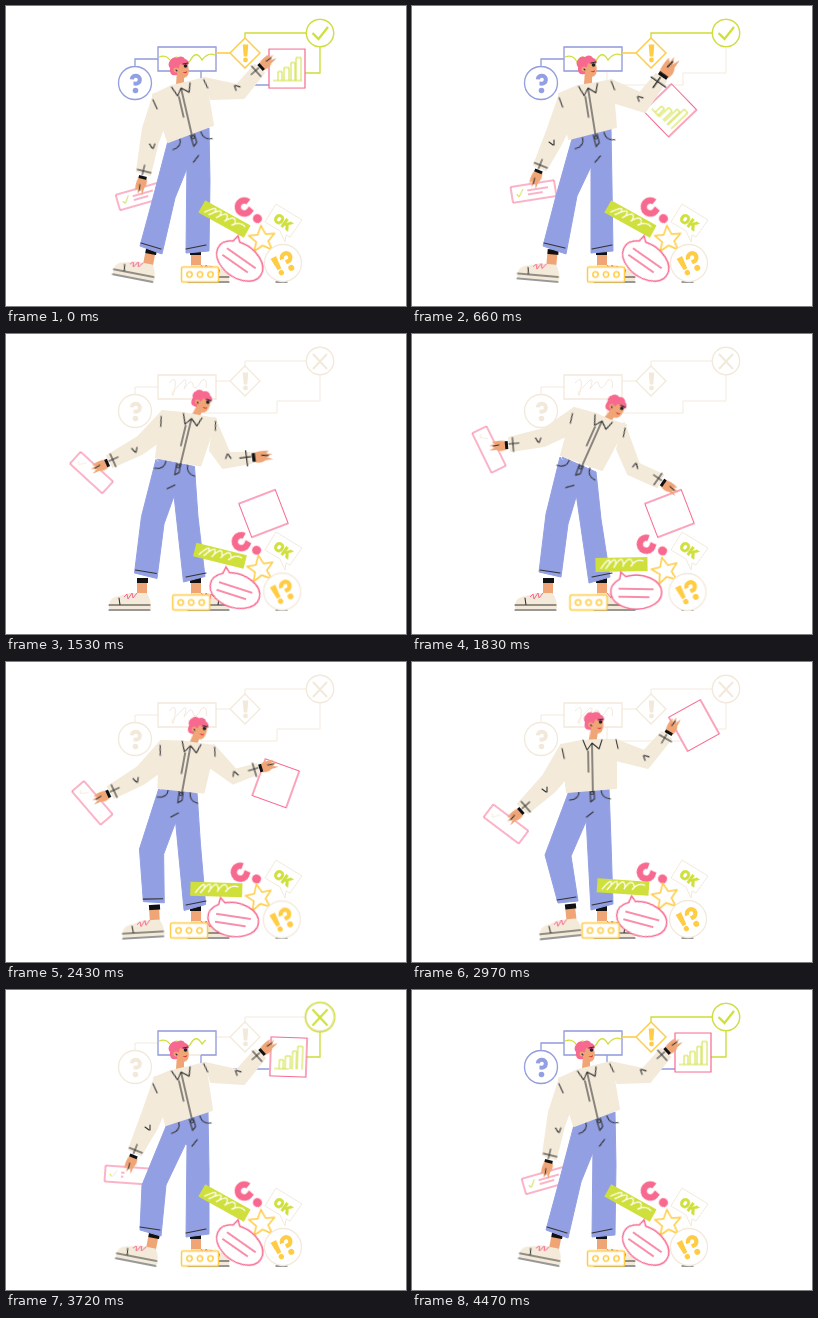
These frames come from a looping animation (400 px wide and 300 px high, 4.5 s). An HTML page without scripts:

```html
<!DOCTYPE html>
<html lang="en">
<head>
<meta charset="utf-8">
<title>Rebuilding a workflow</title>
<style>
html, body { margin: 0; width: 100%; height: 100%; overflow: hidden; background: #fff; }
svg { display: block; width: 100vw; height: 100vh; fill: none; }
svg * { animation: 4.5s ease-in-out infinite; }

.blue { stroke: #929fe2; }
.green { stroke: #cfe03c; }
.yellow { stroke: #fc4; }
.pink { stroke: #f7698f; }
.pale { stroke: #f3e9db; }
.ink { stroke: #333; stroke-width: 1.1; stroke-linecap: round; stroke-linejoin: round; }
.shirt { fill: #f3eada; stroke: #f3eada; stroke-width: 2; stroke-linejoin: round; }
.jeans { fill: #929fe2; stroke: #929fe2; stroke-linejoin: round; }
.skin { fill: #f0a576; }
.paper { fill: #fff; }
.trace { stroke-dasharray: 1 2; stroke-width: 1.3; }

/* Body */
#torso { animation-name: torso; }
@keyframes torso {
  0%, 100% { d: path("M147 89L166 80L183 76L199 72L207 119L162 136Z"); }
  14.7% { d: path("M147 88L166 80L185 77L200 74L204 121L157 133Z"); }
  27.3% { d: path("M150 80L170 78L190 78L206 79L199 127L151 126Z"); }
  40.7% { d: path("M162 74L184 80L197 86L214 91L190 136L149 121Z"); }
  66% { d: path("M149 83L169 79L188 78L204 78L204 126L155 130Z"); }
  82.7% { d: path("M148 88L165 81L183 77L199 73L206 120L160 135Z"); }
}
#armL { animation-name: armL; }
@keyframes armL {
  0%, 100% { d: path("M148 88L137 122L131 165L144 169L152 136L160 115Z"); }
  14.7% { d: path("M148 88L135 125L122 159L134 164L148 140L157 122Z"); }
  27.3% { d: path("M151 80L131 112L105 140L115 149L140 128L153 112Z"); }
  40.7% { d: path("M162 74L132 95L97 104L99 117L132 112L158 100Z"); }
  66% { d: path("M149 83L131 114L106 142L116 151L142 130L155 115Z"); }
  82.7% { d: path("M149 87L136 124L123 159L135 165L150 140L158 122Z"); }
}
#armR { animation-name: armR; }
@keyframes armR {
  0%, 100% { d: path("M198 72L231 79L249 59L258 67L238 92L205 93Z"); }
  14.7% { d: path("M199 74L228 87L244 68L254 75L233 106L204 97Z"); }
  27.3% { d: path("M205 79L220 108L236 96L245 105L218 128L203 118Z"); }
  40.7% { d: path("M212 89L227 130L251 141L245 153L216 140L205 115Z"); }
  66% { d: path("M204 78L232 89L250 70L259 77L236 106L204 98Z"); }
  82.7% { d: path("M199 73L231 80L249 60L259 68L238 94L205 92Z"); }
}
#legL { animation-name: legL; }
@keyframes legL {
  0%, 100% { d: path("M162 135L147 192L134 240L156 248L169 192L186 150Z"); }
  14.7% { d: path("M160 133L144 190L131 240L154 248L165 190L184 150Z"); }
  27.3% { d: path("M152 128L137 185L130 240L153 246L160 190L176 152Z"); }
  40.7% { d: path("M148 123L134 180L127 238L149 243L156 190L168 150Z"); }
  66% { d: path("M157 129L133 193L146 241L166 239L159 194L176 155Z"); }
  82.7% { d: path("M161 134L136 195L134 240L155 246L160 195L180 153Z"); }
}
#legR { animation-name: legR; }
@keyframes legR {
  0%, 100% { d: path("M163 135L203 122L204 175L203 245L180 247L181 155Z"); }
  14.7% { d: path("M161 133L199 123L200 180L201 245L179 247L179 155Z"); }
  27.3% { d: path("M153 127L193 127L195 180L200 242L178 247L171 152Z"); }
  40.7% { d: path("M150 123L184 138L189 185L198 243L177 249L163 152Z"); }
  66% { d: path("M158 129L197 126L199 180L201 242L179 248L174 155Z"); }
  82.7% { d: path("M162 134L202 122L203 180L203 244L180 247L181 155Z"); }
}
#hemL { animation-name: hemL; }
@keyframes hemL {
  0%, 100% { d: path("M135 237L155 243"); }
  14.7% { d: path("M132 237L153 242"); }
  27.3% { d: path("M131 236L153 240"); }
  40.7% { d: path("M128 236L148 239"); }
  66% { d: path("M145 238L164 235"); }
  82.7% { d: path("M134 237L154 240"); }
}
#head { animation-name: head; }
@keyframes head {
  0%, 100% { transform: translate(172px, 61px); }
  14.7% { transform: translate(174px, 60px); }
  27.3% { transform: translate(186px, 61px) rotate(14deg); }
  40.7% { transform: translate(203px, 71px) rotate(34deg); }
  66% { transform: translate(181px, 60px) rotate(7deg); }
  82.7% { transform: translate(172px, 61px); }
}
#seams { animation-name: seams; }
@keyframes seams {
  0%, 100% { transform: translate(175px, 82px) rotate(-13deg); }
  14.7% { transform: translate(176px, 82px) rotate(-9deg); }
  27.3% { transform: translate(181px, 82px) rotate(3deg); }
  40.7% { transform: translate(190px, 87px) rotate(24deg); }
  66% { transform: translate(180px, 81px) rotate(-1deg); }
  82.7% { transform: translate(175px, 82px) rotate(-13deg); }
}
#waist { animation-name: waist; }
@keyframes waist {
  0%, 100% { transform: translate(184px, 128px) rotate(-17deg); }
  14.7% { transform: translate(181px, 128px) rotate(-14deg); }
  27.3% { transform: translate(174px, 127px); }
  40.7% { transform: translate(168px, 129px) rotate(20deg); }
  66% { transform: translate(178px, 127px) rotate(-3deg); }
  82.7% { transform: translate(183px, 128px) rotate(-16deg); }
}
#handL { animation-name: handL; }
@keyframes handL {
  0%, 100% { transform: translate(137px, 170px) rotate(104deg); }
  14.7% { transform: translate(127px, 164px) rotate(112deg); }
  27.3% { transform: translate(109px, 146px) rotate(137deg); }
  40.7% { transform: translate(96px, 111px) rotate(175deg); }
  66% { transform: translate(110px, 148px) rotate(139deg); }
  82.7% { transform: translate(128px, 165px) rotate(112deg); }
}
#handR { animation-name: handR; }
@keyframes handR {
  0%, 100% { transform: translate(254px, 62px) rotate(-42deg); }
  14.7% { transform: translate(250px, 71px) rotate(-55deg) scale(1.25); }
  27.3% { transform: translate(242px, 99px) rotate(-50deg) scale(1.2); }
  40.7% { transform: translate(250px, 148px) rotate(35deg); }
  66% { transform: translate(256px, 72px) rotate(-60deg); }
  82.7% { transform: translate(255px, 63px) rotate(-42deg); }
}
#foldL { animation-name: foldL; }
@keyframes foldL {
  0%, 100% { transform: translate(146px, 140px) rotate(20deg); }
  14.7% { transform: translate(140px, 137px); }
  27.3% { transform: translate(131px, 126px); }
  40.7% { transform: translate(126px, 106px) rotate(20deg); }
  66% { transform: translate(133px, 128px); }
  82.7% { transform: translate(142px, 138px); }
}
#foldR { animation-name: foldR; }
@keyframes foldR {
  0%, 100% { transform: translate(231px, 81px) rotate(160deg); }
  14.7% { transform: translate(228px, 92px) rotate(160deg); }
  27.3% { transform: translate(221px, 113px) rotate(180deg); }
  40.7% { transform: translate(224px, 132px) rotate(220deg); }
  66% { transform: translate(234px, 95px) rotate(160deg); }
  82.7% { transform: translate(232px, 82px) rotate(160deg); }
}
#footL { animation-name: footL; }
@keyframes footL {
  0%, 100% { transform: translate(147px, 275px) rotate(11deg); }
  14.7% { transform: translate(146px, 275px) rotate(5deg); }
  27.3%, 40.7% { transform: translate(144px, 275px); }
  66% { transform: translate(169px, 272px) rotate(-6deg); }
  82.7% { transform: translate(150px, 275px) rotate(11deg); }
}

/* Things carried */
#card { animation-name: card; }
@keyframes card {
  0%, 100% { transform: translate(133px, 190.5px) rotate(-16deg); }
  14.7% { transform: translate(121.5px, 185.5px) rotate(-9deg); }
  27.3% { transform: translate(94px, 162px) rotate(21deg); }
  40.7% { transform: translate(77px, 115.5px) rotate(64deg); }
  66% { transform: translate(94px, 162px) rotate(37deg); }
  82.7% { transform: translate(121px, 185px) rotate(4deg); }
}
#panel { animation-name: panel; }
@keyframes panel {
  0%, 100% { transform: translate(281px, 62.5px); }
  7% { transform: translate(281px, 63px); animation-timing-function: ease-in; }
  14.7% { transform: translate(258px, 104.5px) rotate(46deg); animation-timing-function: linear; }
  22%, 42% { transform: translate(257.5px, 179.5px) rotate(69deg); }
  66% { transform: translate(282px, 63.5px) rotate(-29deg); }
  82.7% { transform: translate(282.5px, 67px) rotate(2deg); }
}
#chart path { animation-name: chart; }
@keyframes chart {
  0%, 8%, 91%, 100% { stroke-dashoffset: 0; }
  20%, 74% { stroke-dashoffset: 1.02; }
}

/* Diagram colour draws off and back on */
#ring { animation-name: ring; }
@keyframes ring {
  0%, 15.5%, 83%, 100% { stroke-dashoffset: 0; }
  22%, 74% { stroke-dashoffset: 1.02; }
}
#tick { animation-name: tick; }
@keyframes tick {
  0%, 16%, 88%, 100% { stroke-dashoffset: 0; }
  20%, 83% { stroke-dashoffset: 1.02; }
}
#wire { animation-name: wire; }
@keyframes wire {
  0%, 17%, 93%, 100% { stroke-dashoffset: 0; }
  24%, 84% { stroke-dashoffset: 1.02; }
}
#drop, #link { animation-name: drop; }
@keyframes drop {
  0%, 7%, 80%, 100% { stroke-dashoffset: 0; }
  13%, 74% { stroke-dashoffset: 1.02; }
}
#frame, #wave { animation-name: frame; }
@keyframes frame {
  0%, 17%, 85%, 100% { stroke-dashoffset: 0; }
  25%, 76% { stroke-dashoffset: 1.02; }
}
#gem { animation-name: gem; }
@keyframes gem {
  0%, 21%, 91%, 100% { stroke-dashoffset: 0; }
  32%, 84% { stroke-dashoffset: 1.02; }
}
#disc { animation-name: disc; }
@keyframes disc {
  0%, 23%, 96%, 100% { stroke-dashoffset: 0; }
  34%, 88% { stroke-dashoffset: 1.02; }
}
#note { animation-name: note; }
@keyframes note {
  0%, 18%, 94%, 100% { stroke-dashoffset: 0; }
  32%, 78% { stroke-dashoffset: 1.02; }
}
#bang { animation-name: bang; }
@keyframes bang {
  0%, 27%, 90%, 100% { color: #fc4; }
  32%, 85% { color: #f3e9db; }
}
#ask { animation-name: ask; }
@keyframes ask {
  0%, 28%, 95%, 100% { color: #929fe2; }
  34%, 89% { color: #f3e9db; }
}
#cross { animation-name: cross; }
@keyframes cross {
  0%, 19%, 86%, 100% { opacity: 0; stroke: #f3e9db; }
  22%, 78% { opacity: 1; stroke: #f3e9db; }
  81%, 83% { opacity: 1; stroke: #cfe03c; }
}
#scrawl { animation-name: scrawl; }
@keyframes scrawl {
  0%, 20%, 82%, 100% { opacity: 0; }
  25%, 76% { opacity: 1; }
}
#goal { transform-origin: 314px 27px; animation-name: pop; }
@keyframes pop {
  0%, 76%, 90%, 100% { transform: none; }
  83% { transform: scale(1.08); }
}

/* Pile */
#query { animation-name: query; }
@keyframes query {
  0%, 20%, 82.7%, 100% { transform: translate(239px, 201px) rotate(-47deg); }
  27.3% { transform: translate(237px, 205px) rotate(-52deg); }
  40.7%, 66% { transform: translate(235px, 210px) rotate(-66deg); }
}
#banner { animation-name: banner; }
@keyframes banner {
  0%, 27.3%, 82.7%, 100% { transform: translate(218.5px, 213px) rotate(29deg); }
  40.7% { transform: translate(209.5px, 230.5px) rotate(-1deg); }
  66% { transform: translate(211px, 225px) rotate(4deg); }
}
#star { animation-name: star; }
@keyframes star {
  0%, 27.3%, 82.7%, 100% { transform: translate(256px, 232.5px) rotate(-5deg); }
  40.7% { transform: translate(253px, 236px) rotate(-14deg); }
  66% { transform: translate(253px, 234px) rotate(-10deg); }
}
#bubble { animation-name: bubble; }
@keyframes bubble {
  0%, 27.3%, 82.7%, 100% { transform: translate(234px, 255px) rotate(35deg); }
  40.7% { transform: translate(224.5px, 258px) rotate(1deg); }
  66% { transform: translate(230px, 257px) rotate(15deg); }
}
#dots { animation-name: dots; }
@keyframes dots {
  0%, 27.3%, 82.7%, 100% { transform: translate(194px, 268.5px); }
  40.7% { transform: translate(176.5px, 268.5px); }
  66% { transform: translate(188.5px, 268.5px); }
}
#shout { animation-name: shout; }
@keyframes shout {
  0%, 27.3%, 82.7%, 100% { transform: translate(277px, 257px); }
  40.7% { transform: translate(275.5px, 258px); }
  66% { transform: translate(276px, 257px); }
}
</style>
</head>
<body>
<svg viewBox="0 0 400 300">
  <defs>
    <g id="askMark">
      <path d="M-6-1A6.5 6.5 0 1 1 0 6V9" stroke="currentColor" stroke-width="6.5"/>
      <circle cy="17" r="4.5" fill="currentColor"/>
    </g>
    <g id="bangMark">
      <path d="M-2.8-8.500H2.800L1.800 3.500H-1.800Z" fill="currentColor"/>
      <circle cy="7" r="2.400" fill="currentColor"/>
    </g>
    <g id="shoe">
      <path class="skin" d="M-13-30H-3V-12H-13Z"/>
      <path d="M-13-31H-2V-26H-13Z" fill="#111"/>
      <path class="shirt" d="M0-1H-40Q-41-11-30-12L-20-15H-4Q0-10 0-1Z"/>
      <path class="ink" d="M0 1H-41M0-4H-41M-31-11L-30-4"/>
      <path class="pink" d="M-26-12l3-3 1 5 4-6 1 5 4-5"/>
    </g>
    <g id="hand">
      <path class="skin" d="M1-4Q7-7 12-4L19-4 13-1 19 1 13 2 16 4Q10 6 2 4Z"/>
      <path class="ink" d="M9 1l6-1"/>
      <path d="M0-4H3V4H0Z" fill="#111"/>
      <path class="ink" d="M-5-7V7M-11 1H-1"/>
    </g>
  </defs>

  <!-- Diagram -->
  <g class="pale">
    <path d="M129 61V53H152M210 47H225M239 32V27H300M314 41V67H271V79H195V65"/>
    <circle cx="129" cy="77" r="16.5" stroke-width="1.3"/>
    <path d="M152 41H210V65H152Z" stroke-width="1.3"/>
    <path d="M239 32L254 47 239 62 224 47Z" stroke-width="1.3"/>
    <circle cx="314" cy="27" r="13.7" stroke-width="1.4"/>
    <path id="scrawl" d="M163 49q8-9 6 4t-3 6q2-3 12-13q4-2 0 9q8-12 9-4q2 8 9-5q6-2 4 8"/>
  </g>
  <path id="disc" class="trace blue" pathLength="1" d="M129 60.5A16.5 16.5 0 0 1 129 93.5A16.5 16.5 0 0 1 129 60.5V53H152"/>
  <g id="ask"><use href="#askMark" transform="translate(129.5 74) scale(.62)"/></g>
  <path id="frame" class="trace blue" pathLength="1" d="M195 65H210V41H152V65H195"/>
  <path id="link" class="trace blue" pathLength="1" d="M263 79H195V65"/>
  <path id="wave" class="trace green" pathLength="1" d="M153 51q8-3 12 5q5-9 11-1q5 3 8 0q6-12 12-1q6-8 13-5"/>
  <path id="gem" class="trace yellow" pathLength="1" d="M239 32L254 47 239 62 224 47 239 32M224 47H210"/>
  <g id="bang"><use href="#bangMark" transform="translate(239.5 47)"/></g>
  <path id="wire" class="trace green" pathLength="1" d="M300 27H239V32"/>
  <path id="drop" class="trace green" pathLength="1" d="M314 41V67H299"/>
  <g id="goal">
    <circle id="ring" class="trace green" pathLength="1" cx="314" cy="27" r="13.7"/>
    <path id="cross" d="M307 20l14 15M321 20l-14 15" stroke-width="2"/>
    <path id="tick" class="trace green" style="stroke-width:2.3" pathLength="1" d="M306.5 27l6 6 9.5-12"/>
  </g>

  <path class="ink" d="M270 276h11"/>

  <g id="panel">
    <path class="paper pink" d="M-18-19.500H18V19.500H-18Z" stroke-width="1.2"/>
    <g id="chart" class="green" stroke-dasharray="1 2">
      <path pathLength="1" d="M-9 12V3H-5V12M-3 12V-1H2V12M4 12V-6H8V12M9 12V-11H14V12"/>
      <path pathLength="1" d="M-14 12H15"/>
    </g>
  </g>

  <g id="card">
    <path class="paper pink" d="M-22-8H22V8H-22Z"/>
    <path class="pale" d="M-17 0l2 3 5-7"/>
    <g stroke-dasharray="1 2" id="note">
      <path class="green" pathLength="1" d="M-17 0l2 3 5-7"/>
      <path class="pink" pathLength="1" d="M-6-2H15"/>
      <path class="pink" pathLength="1" d="M-6 2H9"/>
    </g>
  </g>

  <!-- Person -->
  <use href="#shoe" transform="translate(182 275) scale(-1 1)"/>
  <g id="footL"><use href="#shoe"/></g>
  <path id="legR" class="jeans"/>
  <path id="legL" class="jeans"/>
  <path id="hemL" class="ink"/>
  <path class="ink" d="M180 243L200 239"/>
  <g id="waist" class="ink">
    <path d="M-11 1q0 9-10 9M11 1q0 9 9 10M0 1V13M4 1V10L0 13M-5 28l7-5"/>
    <circle cx="2" cy="4" r="1.5"/>
  </g>
  <g id="head">
    <path class="skin" d="M-1 4H6V18L2 23-2 18Z"/>
    <path class="skin" d="M-3-5H9Q12 3 10 8 7 13 2 10L-4 6Z"/>
    <path d="M-8 1a5 5 0 0 1 0-7a5 5 0 0 1 7-3a5 5 0 0 1 8 1a4 4 0 0 1 3 6q-4 1-8-1l-1 4-2 1v6q-8 2-7-7" fill="#f7698f"/>
    <circle class="skin" cx="-2" cy="3" r="2.5"/>
    <path class="ink" d="M5-3l5-1M-2 3l1 1"/>
    <circle cx="7.500" cy="-1" r="1.800" fill="#222"/>
    <path d="M4 5q3 1 5-1q0 4-5 1" fill="#d33"/>
  </g>
  <path id="armL" class="shirt"/>
  <path id="armR" class="shirt"/>
  <path id="torso" class="shirt"/>
  <path id="seams" class="ink" d="M-9-3L-5 7 0 0 7 6 10-3M0 0V49M-4 8V29M-30 5l2 10M24-3l2 9"/>
  <path id="foldL" class="ink" d="M-3-1L1 2M2-3V2"/>
  <path id="foldR" class="ink" d="M-3-1L1 2M2-3V2"/>
  <g id="handL"><use href="#hand"/></g>
  <g id="handR"><use href="#hand" transform="scale(1 -1)"/></g>

  <!-- Pile -->
  <g id="query" color="#f7698f"><use href="#askMark" transform="scale(-1 1)"/></g>
  <path class="paper pale" d="M270 198L296 214 284 231 280 229 279 236 274 225 259 216Z"/>
  <text transform="translate(277 216) rotate(36)" y="4.7" text-anchor="middle" fill="#cfe03c" class="green" stroke-width=".5" font-family="Inter, sans-serif" font-weight="900" font-size="13">OK</text>
  <g id="banner">
    <path d="M-26-7H26V7H-26Z" fill="#cfe03c"/>
    <path d="M-21 4q8-11 9-8t-4 8q9-12 10-8t-2 7q7-11 9-7t0 6q6-10 9-6t-1 6q6-8 13-5" stroke="#fff" stroke-width="1.2"/>
  </g>
  <path id="star" class="paper yellow" stroke-width="1.6" stroke-linejoin="round" d="M0-13L4-4 13-4 6 3 9 12 0 7-9 12-6 3-13-4-4-4Z"/>
  <g id="shout">
    <circle class="paper pale" r="18.5" stroke-width="1.3"/>
    <g color="#fc4" transform="rotate(-28)">
      <use href="#bangMark" transform="translate(-6 0) scale(1.1)"/>
      <use href="#askMark" transform="translate(5 -3) scale(.66)"/>
    </g>
  </g>
  <g id="bubble" class="pink" stroke-width="1.5">
    <path class="paper" d="M-11-15.300L-16-19.500-17-12.700A25.500 17 0 1 0-11-15.300Z"/>
    <path d="M-18-3H17M-18 5H13"/>
  </g>
  <g id="dots" class="paper yellow" stroke-width="1.5">
    <rect x="-18.5" y="-7.5" width="37" height="15" rx="1.5"/>
    <circle cx="-10.5" r="2.7"/>
    <circle r="2.7"/>
    <circle cx="10.5" r="2.7"/>
  </g>
</svg>
</body>
</html>
```
